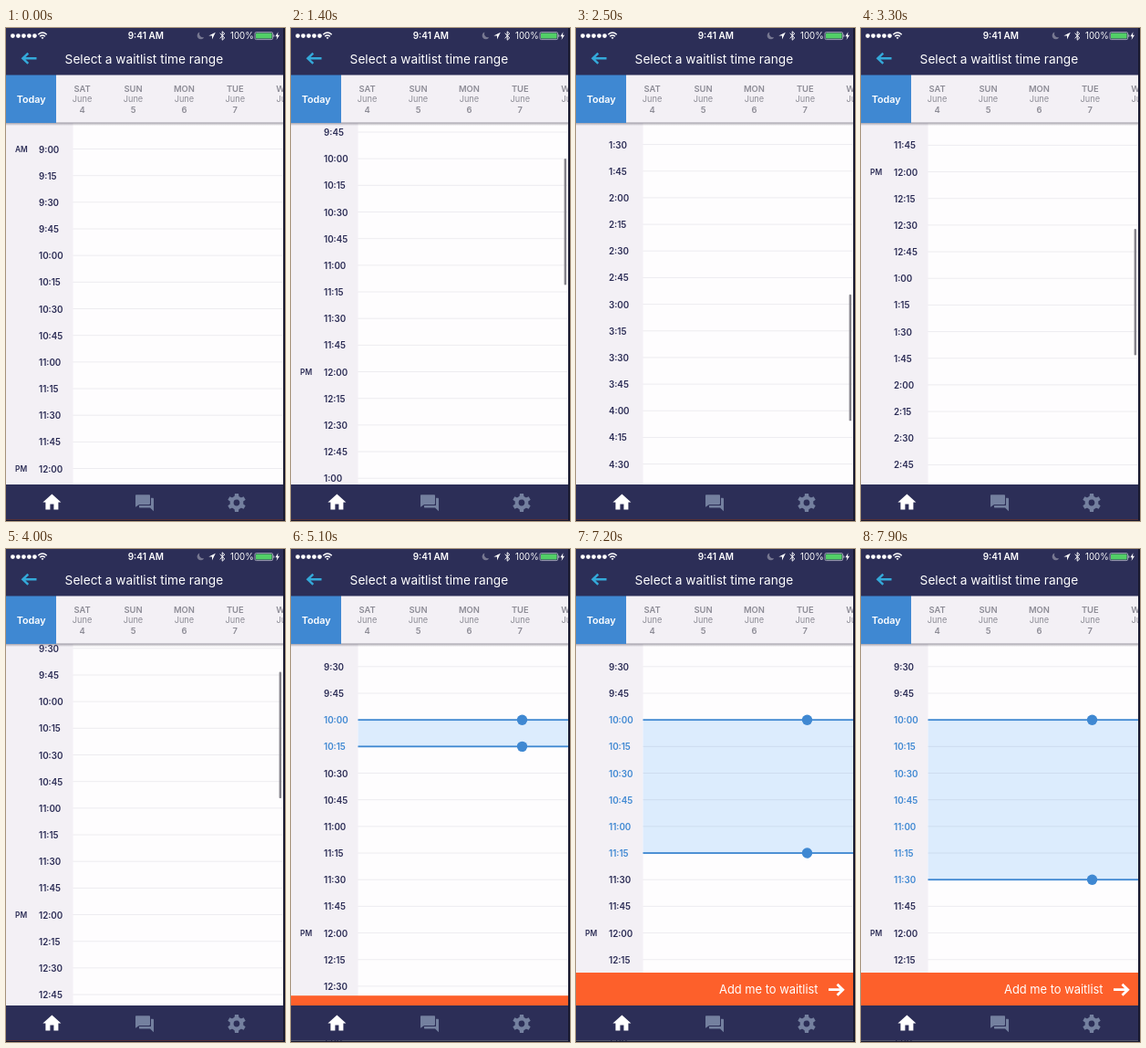
Recreate the animation shown at these times as an HTML page. Size 306 px wide and 540 px high, loop 8 s.

```html
<!DOCTYPE html>
<html lang="en">
<head>
<meta charset="utf-8">
<title>Waitlist time range</title>
<style>
  html, body { margin: 0; width: 100%; height: 100%; overflow: hidden; background: #17182f; }
  svg { display: block; width: 306px; height: 540px; }
  text { font-family: Inter, Roboto, sans-serif; }
  .mid { text-anchor: middle; }
  .bold { font-weight: 600; }
  .day { fill: #8d8c96; }
  .navy { fill: #2c2e57; }
  .row { fill: #2b2c55; font-weight: 600; font-size: 9.8px; }
  .row.on { fill: #3f88d2; }
</style>
</head>
<body>
<svg viewBox="0 0 306 540">
  <defs>
    <linearGradient id="shade" x2="0" y2="1">
      <stop offset="0" stop-color="#55505f" stop-opacity=".55"/>
      <stop offset="1" stop-color="#55505f" stop-opacity="0"/>
    </linearGradient>
    <clipPath id="screen"><rect width="304" height="540"/></clipPath>
  </defs>

  <g clip-path="url(#screen)">
    <rect width="304" height="540" fill="#fefdfe"/>
    <rect y="104" width="73.5" height="396" fill="#f3f0f5"/>

    <rect id="range" x="73.5" width="231" fill="#dcecfd"/>
    <g id="list"></g>
    <g id="handles" fill="#3f88d2"></g>
    <rect id="thumb" x="299.6" width="2.4" height="138.5" rx="1.2" fill="#85838b"/>

    <!-- call to action -->
    <g id="action">
      <rect y="464" width="304" height="40" fill="#fd602b"/>
      <text x="157" y="487.4" font-size="12.9" fill="#fff">Add me to waitlist</text>
      <path d="M277 482.7H292M286.5 476.7L292.7 482.7L286.5 488.7" fill="none" stroke="#fff" stroke-width="2.8"/>
    </g>

    <!-- date strip -->
    <rect y="51" width="304" height="53" fill="#f3f0f5"/>
    <rect y="103.5" width="304" height="3.5" fill="url(#shade)"/>
    <g id="days"></g>
    <rect y="51" width="55" height="53" fill="#3f88d2"/>
    <text class="mid bold" x="27.7" y="81.7" font-size="10.8" fill="#fff">Today</text>

    <!-- header -->
    <rect class="navy" width="304" height="51.5"/>
    <path d="M33.5 33.3H19M24.3 27.7L18.4 33.3L24.3 38.9" fill="none" stroke="#34a9d9" stroke-width="2.5"/>
    <text x="64.6" y="38.7" font-size="13.7" fill="#fff">Select a waitlist time range</text>

    <!-- status bar -->
    <g id="signal" fill="#fff"></g>
    <g fill="none" stroke="#fff" stroke-width="1.5">
      <path d="M35.3 7.2Q40 2.9 44.7 7.2M37.1 9.2Q40 6.7 42.9 9.2"/>
      <path d="M234.6 5.8L239.8 10.8L237.2 13.2V3.8L239.8 6.2L234.6 11.2" stroke-width="1"/>
      <rect x="273" y="4.6" width="19.6" height="8" rx="1.4" stroke="#b9bac9" stroke-width=".8"/>
    </g>
    <path d="M38.5 10.6Q40 9.4 41.5 10.6L40 12.2Z" fill="#fff"/>
    <text class="mid bold" x="153.3" y="12.3" font-size="10" fill="#fff">9:41 AM</text>
    <path d="M212.3 4.6A4 4 0 1 0 217.2 10.2A4.2 4.2 0 0 1 212.3 4.6Z" fill="#777891"/>
    <path d="M229.8 4.7L222.3 8.5H226V12.4Z" fill="#fff"/>
    <text x="246" y="12.1" font-size="9.7" fill="#fff">100%</text>
    <rect x="274" y="5.6" width="17.6" height="6" rx=".7" fill="#52cf67"/>
    <path d="M293.3 7.1v3q1.2-.3 1.2-1.5t-1.2-1.5" fill="#b9bac9"/>
    <path d="M298.5 4.2L295.4 9.2H297.4L296.6 13L300 7.8H297.9Z" fill="#fff"/>

    <!-- tab bar -->
    <rect class="navy" y="500" width="304" height="38.5"/>
    <rect y="538.5" width="304" height="1.5" fill="#17182f"/>
    <path transform="translate(38.4 507.6)" fill="#fff" d="M10 20v-6h4v6h5v-8h3L12 3 2 12h3v8z"/>
    <g fill="#74809f">
      <path transform="translate(140 509.4) scale(1 .9)" d="M21 6h-2v9H6v2c0 .55.45 1 1 1h11l4 4V7c0-.55-.45-1-1-1zm-3 7V3c0-.55-.45-1-1-1H3c-.55 0-1 .45-1 1v14l4-3h11c.55 0 1-.45 1-1z"/>
      <g id="gear" transform="translate(253 520)"></g>
    </g>
  </g>
</svg>
<script>
const LOOP = 8000, FRAME = 100, STEP = 29.17, FIRST = 133;

// [time, value] tables
const SCROLL = [[900, 0], [1100, 14], [1400, 106], [1700, 260], [2000, 410], [2300, 505],
  [2500, 530], [2800, 532], [3000, 490], [3300, 325], [3600, 180], [3800, 118],
  [4000, 82], [4200, 67], [4400, 62]];
const THUMB = [[900, 0], [1100, 1], [4500, 1], [4800, 0]];
const RISE = [[5000, 0], [5100, .3], [5200, .65], [5300, .9], [5400, 1]];
const END_ROW = [[4900, 5], [5900, 5], [6000, 6], [6200, 6], [6300, 7], [6600, 7], [6700, 8],
  [6900, 8], [7000, 9], [7200, 9], [7300, 10]];
const START_ROW = 4, SELECT_AT = 4900;

const $ = id => document.getElementById(id);

function add(parent, tag, attrs, text) {
  const el = document.createElementNS("http://www.w3.org/2000/svg", tag);
  for (const k in attrs) el.setAttribute(k, attrs[k]);
  if (text) el.textContent = text;
  return parent.appendChild(el);
}

function at(table, t) {
  const i = table.findIndex(p => p[0] > t);
  if (i < 0) return table[table.length - 1][1];
  if (i === 0) return table[0][1];
  const [t0, a] = table[i - 1], [t1, b] = table[i];
  return a + (b - a) * (t - t0) / (t1 - t0);
}

// quarter-hour rows from 9:00
const rows = Array.from({ length: 38 }, (_, i) => {
  const y = FIRST + i * STEP, hour = 9 + Math.floor(i / 4);
  const label = ((hour - 1) % 12 + 1) + ":" + String(i % 4 * 15).padStart(2, "0");
  const half = { 0: "AM", 12: "PM" }[i];
  add($("list"), "rect", { x: 73.5, y: y - 1, width: 231, height: 1, fill: "#2b2c55", opacity: .08 });
  if (half) add($("list"), "text", { x: 10, y: y + 3, class: "bold", "font-size": 8.4, fill: "#2b2c55" }, half);
  return add($("list"), "text", { x: 36, y: y + 3.5, class: "row" }, label);
});

["SAT", "SUN", "MON", "TUE", "WED"].forEach((name, i) => {
  const x = 83.6 + i * 55.9;
  add($("days"), "text", { x, y: 69.6, class: "mid bold day", "font-size": 9.4 }, name);
  add($("days"), "text", { x, y: 81.2, class: "mid day", "font-size": 9.2 }, "June");
  add($("days"), "text", { x, y: 93, class: "mid bold day", "font-size": 9.4 }, String(4 + i));
});

for (let i = 0; i < 5; i++) add($("signal"), "circle", { cx: 7.4 + i * 6, cy: 8.6, r: 2.4 });

for (let a = 0; a < 360; a += 60)
  add($("gear"), "path", { d: "M-2.7 -5L-2 -10H2L2.7 -5Z", transform: `rotate(${a})` });
add($("gear"), "circle", { r: 5.4, fill: "none", stroke: "#74809f", "stroke-width": 4 });

function addHandle() {
  const g = add($("handles"), "g", {});
  add(g, "rect", { x: 73.5, y: -.9, width: 231, height: 1.8 });
  add(g, "circle", { cx: 253.5, r: 5.7 });
  return g;
}
const startHandle = addHandle(), endHandle = addHandle();

const moveY = (el, y) => el.setAttribute("transform", `translate(0 ${y})`);

function draw(t) {
  const scroll = at(SCROLL, t), selected = t >= SELECT_AT;
  const endRow = Math.round(at(END_ROW, t));
  const lineY = i => FIRST - .5 + i * STEP - scroll;
  const y0 = lineY(START_ROW), y1 = lineY(endRow);

  moveY($("list"), -scroll);
  rows.forEach((r, i) => r.classList.toggle("on", selected && i >= START_ROW && i <= endRow));

  for (const id of ["range", "handles"])
    $(id).setAttribute("visibility", selected ? "visible" : "hidden");
  $("range").setAttribute("y", y0);
  $("range").setAttribute("height", y1 - y0);
  moveY(startHandle, y0);
  moveY(endHandle, y1);

  $("thumb").setAttribute("y", 105.8 + scroll * .351);
  $("thumb").setAttribute("opacity", at(THUMB, t));
  moveY($("action"), 36 * (1 - at(RISE, t)));
}

const startTime = performance.now();
function tick() {
  const t = (performance.now() - startTime) % LOOP;
  draw(Math.floor(t / FRAME) * FRAME);
  requestAnimationFrame(tick);
}
tick();
</script>
</body>
</html>
```
